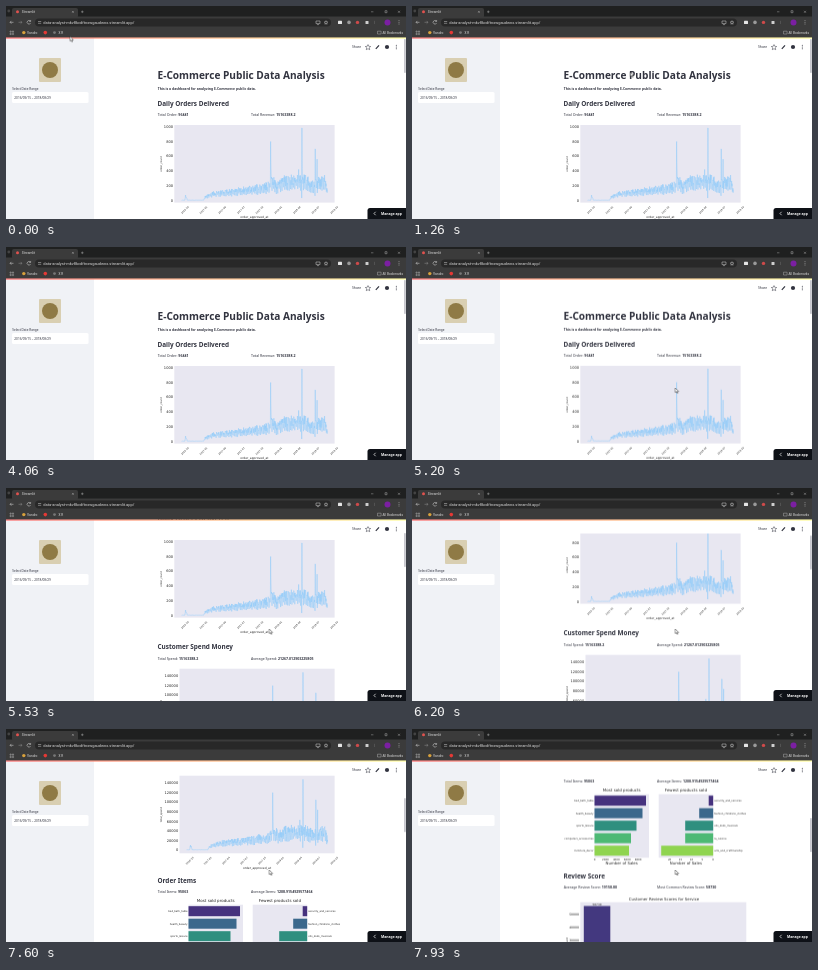
These frames come from a looping animation (400x213 px, 8000 ms). An HTML page:

```html
<!DOCTYPE html>
<html lang="en">
<head>
<meta charset="utf-8">
<title>Dashboard scroll</title>
<style>
  html, body { margin: 0; width: 100%; height: 100%; overflow: hidden; background: #fff; }
  svg { display: block; width: 100vw; height: 100vh; }
  text { font-family: "Noto Sans", sans-serif; fill: #31333f; }
  .plot text { font-family: "DejaVu Sans", sans-serif; fill: #262626; }
  .chrome text { font-family: Roboto, sans-serif; fill: #dcdcdc; }
</style>
</head>
<body>
<svg id="stage" viewBox="0 0 400 213" preserveAspectRatio="none">
  <defs>
    <linearGradient id="accent"><stop stop-color="#ff4b4b"/><stop offset="1" stop-color="#fffd80"/></linearGradient>
  </defs>
</svg>
<script>
const LOOP = 8000;
const stage = document.getElementById('stage');

function el(parent, tag, attrs = {}) {
  const node = document.createElementNS('http://www.w3.org/2000/svg', tag);
  for (const key in attrs) node.setAttribute(key, attrs[key]);
  return parent.appendChild(node);
}
const group = (parent, attrs) => el(parent, 'g', attrs);
const rect = (parent, x, y, width, height, fill, rx = 0) =>
  el(parent, 'rect', { x, y, width, height, fill, rx });
const disc = (parent, cx, cy, r, fill) => el(parent, 'circle', { cx, cy, r, fill });
const stroke = (parent, d, color, width = 0.6) =>
  el(parent, 'path', { d, fill: 'none', stroke: color, 'stroke-width': width, 'stroke-linejoin': 'round' });

// y is the vertical middle of the lowercase line
function label(parent, x, y, string, size, attrs = {}) {
  const node = el(parent, 'text', { x, y: y + size * 0.36, 'font-size': size, ...attrs });
  node.textContent = string;
  return node;
}
const END = { 'text-anchor': 'end' };
const MID = { 'text-anchor': 'middle' };
const BOLD = { 'font-weight': 700 };

function tilted(parent, x, y, string, size, angle) {
  label(parent, x, y, string, size, { ...MID, transform: `rotate(${angle} ${x} ${y})` });
}

function metric(parent, x, y, name, value) {
  const node = label(parent, x, y, name + ': ', 3.55);
  const strong = el(node, 'tspan', { 'font-weight': 600 });
  strong.textContent = value;
}

function random(seed) {
  return () => (seed = (seed * 16807) % 2147483647) / 2147483647;
}

// Daily order volume from September 2016 to August 2018
const DAYS = 713;
const SPIKES = { 434: 300, 435: 800, 436: 520, 437: 400, 572: 420, 587: 30, 588: 985, 589: 430, 652: 60, 653: 700, 662: 560, 663: 100 };
const TREND = [[0, 2], [16, 2], [19, 60], [24, 45], [28, 2], [108, 2], [113, 45], [160, 95], [250, 120], [340, 155],
  [420, 185], [445, 260], [465, 190], [490, 255], [600, 265], [640, 215], [700, 260], [712, 120]];

function trend(day) {
  const i = Math.max(1, TREND.findIndex(([d]) => d >= day));
  const [d0, v0] = TREND[i - 1], [d1, v1] = TREND[i];
  return v0 + (v1 - v0) * (day - d0) / (d1 - d0);
}

function orders(seed) {
  const next = random(seed);
  return Array.from({ length: DAYS }, (_, day) => {
    const weekday = day % 7 < 2 ? 0.58 : 1;
    const value = trend(day) * weekday * (0.75 + 0.6 * next());
    return SPIKES[day] || value;
  });
}

function lineChart(parent, o) {
  const g = group(parent, { class: 'plot' });
  rect(g, o.left, o.top, 328.6 - o.left, 77.6, '#e8e7f1');
  const span = (328.6 - o.left) / 1.1;
  const x0 = o.left + span * 0.05;
  const points = orders(o.seed).map((v, day) =>
    `${(x0 + span * day / (DAYS - 1)).toFixed(2)} ${(o.zero - v * o.scale).toFixed(2)}`);
  stroke(g, 'M' + points.join('L'), '#90caf9', 0.5);
  for (let i = 0; i <= o.ticks; i++) {
    label(g, o.left - 1.3, o.zero - i * o.gap, String(i * o.unit), 3.6, END);
  }
  for (let i = 0; i < 9; i++) {
    const month = 9 + i * 3;
    const date = `${2016 + Math.floor(month / 12)}-${String(month % 12 + 1).padStart(2, '0')}`;
    tilted(g, x0 + span * (16 + i * 91.3) / DAYS, o.top + 85, date, 2.4, -45);
  }
  tilted(g, 154.8, o.top + 39, o.yLabel, 2.6, -90);
  label(g, (o.left + 328.6) / 2, o.top + 92.4, 'order_approved_at', 3, MID);
}

const VIRIDIS = ['#46327e', '#3b688c', '#2f8f7f', '#4db974', '#8fd450'];

function barChart(parent, o) {
  const g = group(parent, { class: 'plot' });
  rect(g, o.left, 376.7, 54.5, 63.5, '#e8e7f1');
  const zero = o.flip ? o.left + 54.5 : o.left;
  label(g, o.left + 27.2, 372.6, o.title, 4, MID);
  o.bars.forEach(([name, length], i) => {
    const y = 383.2 + i * 12.5;
    rect(g, o.flip ? zero - length : zero, y - 5, length, 10, VIRIDIS[i]);
    label(g, o.flip ? zero + 1 : zero - 1, y, name, 2.5, o.flip ? {} : END);
  });
  for (let i = 0; i < 5; i++) {
    label(g, zero + (o.flip ? -1 : 1) * i * 10.9, 442.2, String(i * o.unit), 2.7, MID);
  }
  label(g, o.left + 27.2, 445.8, 'Number of Sales', 3.9, MID);
}

function buildContent() {
  const page = group(stage);
  label(page, 151.5, 69, 'E-Commerce Public Data Analysis', 10.1, BOLD);
  label(page, 151.7, 83, 'This is a dashboard for analyzing E-Commerce public data.', 3.4, BOLD);

  const heading = (y, string) => label(page, 151.5, y, string, 6.4, { 'font-weight': 600 });
  heading(97.2, 'Daily Orders Delivered');
  metric(page, 151.7, 108.7, 'Total Order', '96441');
  metric(page, 245, 108.7, 'Total Revenue', '15163388.2');
  lineChart(page, { left: 168.3, top: 119, zero: 194.3, scale: 0.0735, ticks: 5, unit: 200, gap: 14.7,
    yLabel: 'order_count', seed: 71 });

  heading(226, 'Customer Spend Money');
  metric(page, 151.7, 238, 'Total Spend', '15163388.2');
  metric(page, 245, 238, 'Average Spend', '21267.012903225805');
  lineChart(page, { left: 173.5, top: 247.7, zero: 321.9, scale: 0.0716, ticks: 7, unit: 20000, gap: 9.55,
    yLabel: 'total_spend', seed: 409 });

  heading(352.7, 'Order Items');
  metric(page, 151.7, 363.5, 'Total Items', '95063');
  metric(page, 245, 363.5, 'Average Items', '1208.9154929577464');
  barChart(page, { left: 182.5, title: 'Most sold products', unit: 2000, bars: [
    ['bed_bath_table', 51.5], ['health_beauty', 48], ['sports_leisure', 42],
    ['computers_accessories', 36.5], ['furniture_decor', 34.5]] });
  barChart(page, { left: 246.7, title: 'Fewest products sold', unit: 5, flip: true, bars: [
    ['security_and_services', 4.5], ['fashion_childrens_clothes', 14], ['cds_dvds_musicals', 28],
    ['la_cuisine', 28], ['arts_and_craftmanship', 52]] });

  heading(458.7, 'Review Score');
  metric(page, 151.7, 470, 'Average Review Score', '19158.80');
  metric(page, 245, 470, 'Most Common Review Score', '58730');
  const g = group(page, { class: 'plot' });
  label(g, 252, 481.5, 'Customer Review Scores for Service', 3.9, MID);
  rect(g, 168.3, 484.7, 166, 78, '#e8e7f1');
  rect(g, 171.8, 488.5, 26.5, 74, '#43387f');
  label(g, 185, 486.6, '58730', 2.8, MID);
  for (let i = 0; i < 5; i++) label(g, 167, 496.7 + i * 13.2, String(50000 - i * 10000), 3.1, END);
  tilted(g, 154.8, 524, 'count', 2.8, -90);
  return page;
}

function buildSidebar() {
  rect(stage, 0, 32, 88, 181, '#f0f2f6');
  rect(stage, 33, 52, 22, 24, '#d9cfb2', 1);
  disc(stage, 44, 64, 8, '#8f7a45');
  label(stage, 6.2, 82.4, 'Select Date Range', 3.1);
  rect(stage, 6, 86, 76.5, 11, '#fff', 1.5);
  label(stage, 8.3, 91.6, '2016/09/15 – 2018/08/29', 3.15);
}

function buildHeader() {
  rect(stage, 88, 32, 310, 13.5, '#fff');
  label(stage, 346, 41, 'Share', 3.4);
  stroke(stage, 'M362 38.6l.8 1.7 1.9.2-1.4 1.3.4 1.9-1.7-1-1.7 1 .4-1.9-1.4-1.3 1.9-.2z', '#31333f', 0.5);
  stroke(stage, 'M369.8 42.8l3.2-3.4', '#31333f', 1.2);
  disc(stage, 381, 41, 2.1, '#31333f');
  [39.2, 41, 42.8].forEach(y => disc(stage, 390.3, y, 0.5, '#31333f'));
}

function buildBrowser() {
  const g = group(stage, { class: 'chrome' });
  rect(g, 0, 0, 400, 12, '#1f2020');
  rect(g, 0, 10.5, 400, 21.2, '#3b3b3b');
  rect(g, 6, 2, 66, 10, '#3b3b3b', 2);
  disc(g, 2.8, 5, 1.4, '#444');
  disc(g, 11.5, 5.8, 1.5, '#e0524e');
  label(g, 15.8, 5.8, 'Streamlit', 3.3);
  stroke(g, 'M66 5l1.8 1.8M67.8 5l-1.8 1.8M75 5.8h2.6M76.3 4.5v2.6M365 5.8h2.4M379 4.7h2v2h-2zM392 4.8l2 2M394 4.8l-2 2', '#c8c8c8', 0.4);
  stroke(g, 'M7.5 16.3H4m1.4-1.4L4 16.3l1.4 1.4', '#d8d8d8', 0.5);
  stroke(g, 'M12.5 16.3H16m-1.4-1.4l1.4 1.4-1.4 1.4', '#8c8c8c', 0.5);
  stroke(g, 'M24.4 15.2a1.8 1.8 0 1 0 .2 1.8M24.6 14v1.4h-1.4', '#d8d8d8', 0.5);
  rect(g, 29, 12.4, 296, 8, '#282828', 4);
  stroke(g, 'M32 15.5h3.2M32 17.3h3.2', '#c8c8c8', 0.5);
  label(g, 37.3, 16.4, 'data-analyst-mkv8kcdftnxwgaudwnx.streamlit.app/', 4);
  stroke(g, 'M310 15h4v2.6h-4zM311 18.6h2M320 14.7l.5 1.2 1.3.1-1 .9.3 1.3-1.1-.7-1.1.7.3-1.3-1-.9 1.3-.1z', '#d0d0d0', 0.5);
  rect(g, 332, 14.7, 4, 3.4, '#e5e5e5', 0.5);
  disc(g, 343, 16.4, 1.8, '#9a9a9a');
  disc(g, 351.5, 16.4, 1.7, '#cf4a4a');
  rect(g, 359.5, 14.9, 3, 3, '#d0d0d0', 0.5);
  stroke(g, 'M368.5 14.8v3.2', '#777', 0.4);
  disc(g, 381.5, 16.4, 3, '#7b1fa2');
  [14.8, 16.4, 18].forEach(y => disc(g, 393, y, 0.45, '#d8d8d8'));
  stroke(g, 'M4 25h1.2v1.2H4zM6.4 25h1.2v1.2H6.4zM4 27.4h1.2v1.2H4zM6.4 27.4h1.2v1.2H6.4z', '#c8c8c8', 0.4);
  disc(g, 17.8, 26.6, 1.7, '#d8a13c');
  label(g, 21, 26.6, 'Vandro', 3.3);
  disc(g, 39.3, 26.6, 1.8, '#e53935');
  disc(g, 48.5, 26.6, 1.4, '#777');
  label(g, 52.5, 26.6, 'X R', 3.1);
  stroke(g, 'M371.5 25.2h3.6v2.8h-3.6z', '#c8c8c8', 0.4);
  label(g, 376.5, 26.6, 'All Bookmarks', 3.2);
  rect(stage, 0, 31.6, 400, 0.9, 'url(#accent)');
}

function buildManageButton() {
  el(stage, 'path', { d: 'M361.5 213v-8.5q0-2.5 2.5-2.5h36v11z', fill: '#0e1117' });
  stroke(stage, 'M369.6 205.8l-1.6 1.7 1.6 1.7', '#fff', 0.7);
  label(stage, 375, 207.5, 'Manage app', 3.4, { style: 'fill:#fff', 'font-weight': 600 });
}

function buildCursor() {
  return el(stage, 'path', { d: 'M0 0v4.6l1.1-1 .8 1.8.8-.4-.8-1.7h1.5z',
    fill: '#fff', stroke: '#222', 'stroke-width': 0.45 });
}

// Steps are [time in ms, ...values]
function play(node, steps, style) {
  node.animate(steps.map(([time, ...values]) => ({ offset: time / LOOP, ...style(...values) })),
    { duration: LOOP, iterations: Infinity });
}

const page = buildContent();
buildSidebar();
buildHeader();
const thumb = rect(stage, 398.2, 33, 1.5, 34, '#b9bac2', 0.7);
buildBrowser();
buildManageButton();
const cursor = buildCursor();

const SCROLL = [[0, 0], [5200, 0], [5500, 67], [6130, 67], [6560, 151], [7130, 151], [7500, 201],
  [7660, 201], [7925, 311.5], [LOOP, 311.5]];
play(page, SCROLL, y => ({ transform: `translateY(${-y}px)` }));
play(thumb, SCROLL, y => ({ transform: `translateY(${y * 0.18}px)` }));

const POINTER = [[0, 64, 30.5, 1], [860, 64, 30.5, 1], [1700, 387.5, 105, 1], [3460, 387.5, 105, 1], [3460, 387.5, 105, 0],
  [4330, 387.5, 105, 0], [4330, 387.5, 105, 1], [5130, 263.2, 141, 1], [LOOP, 263.2, 141, 1]];
play(cursor, POINTER, (x, y, opacity) => ({ transform: `translate(${x}px, ${y}px)`, opacity }));
</script>
</body>
</html>
```
